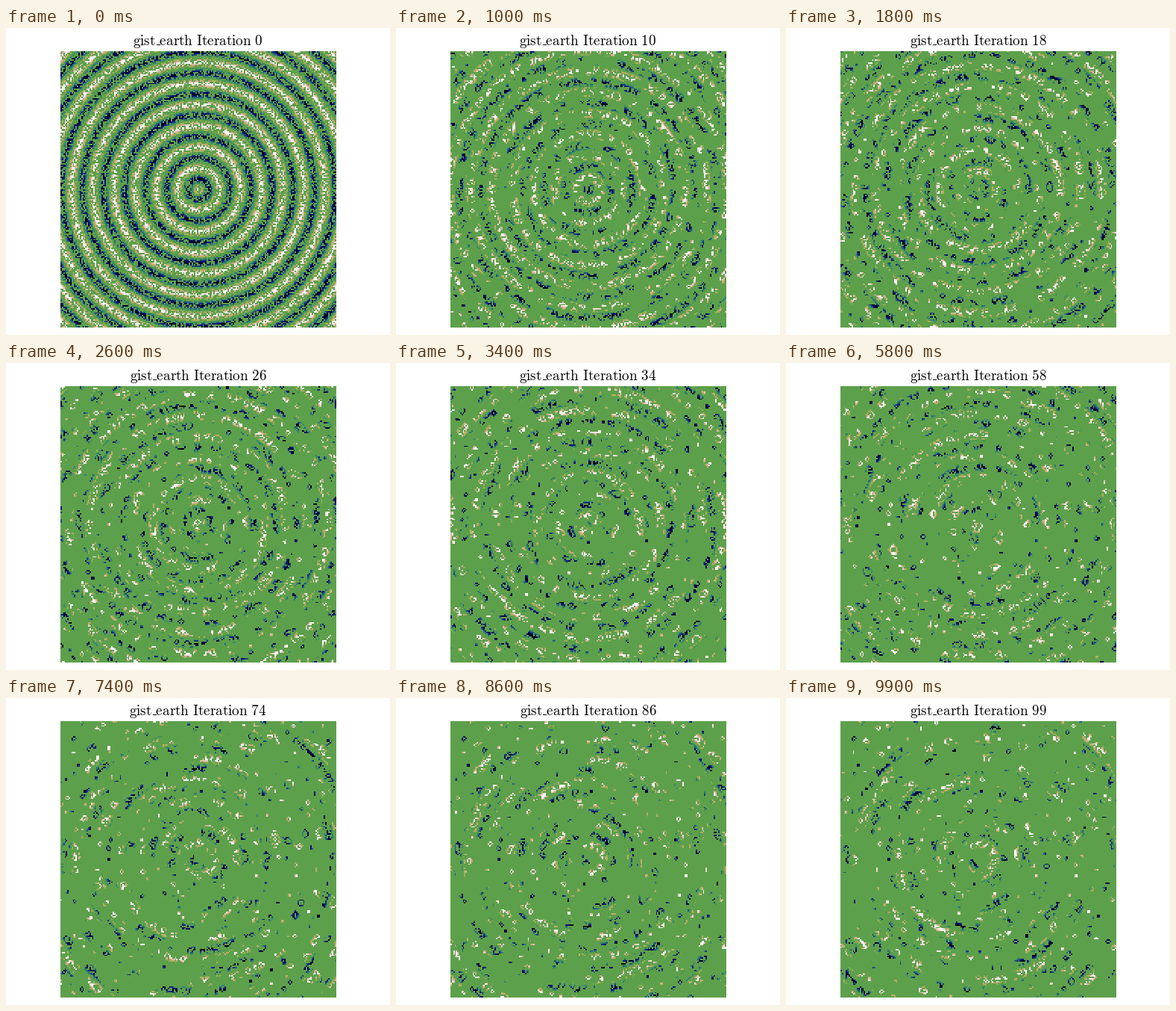
Write a matplotlib script that moves like this. It is 515 px wide and 411 px high and loops after 10 s.

```python
import matplotlib.pyplot as plt
import numpy as np
from matplotlib.animation import FuncAnimation
from matplotlib.patches import Rectangle

W, H, DPI = 515, 411, 100
N, FRAMES = 200, 100
REACH = 13 * np.pi  # wave phase from the centre to the edge

plt.rcParams["mathtext.fontset"] = "cm"


def step(cells):
    """One generation of Conway's Game of Life on a torus."""
    count = sum(
        np.roll(cells, (dy, dx), (0, 1))
        for dy in (-1, 0, 1) for dx in (-1, 0, 1) if dy or dx
    )
    return ((count == 3) | ((cells == 1) & (count == 2))).astype(int)


rng = np.random.default_rng(7)
history = [rng.integers(0, 2, (N, N))]
while len(history) < FRAMES:
    history.append(step(history[-1]))

axis = np.linspace(-REACH, REACH, N)
radius = np.hypot(*np.meshgrid(axis, axis))


def field(i):
    """Living cells coloured by a wave that runs outwards."""
    return history[i] * np.cos(radius - i)


fig = plt.figure(figsize=(W / DPI, H / DPI), dpi=DPI, facecolor="white")
ax = fig.add_axes([73 / W, 10 / H, 370 / W, 370 / H])
ax.axis("off")
image = ax.imshow(field(0), cmap="gist_earth", vmin=-1, vmax=1,
                  interpolation="nearest", aspect="auto")
title = fig.text(257.5 / W, (H - 22.7) / H, "", fontsize=13.8,
                 ha="center", va="baseline")
underscore = Rectangle((0, (H - 23) / H), 5.8 / W, 1 / H, color="black",
                       lw=0, transform=fig.transFigure)
fig.add_artist(underscore)


def draw(i):
    image.set_data(field(i))
    title.set_text(
        rf"$\mathrm{{gist}}\hspace{{0.36}}\mathrm{{earth\ Iteration\ {i}}}$")
    underscore.set_x((201.5 - 5 * (len(str(i)) - 1)) / W)
    return image, title, underscore


anim = FuncAnimation(fig, draw, frames=FRAMES, interval=100,
                     repeat=True, repeat_delay=0)
plt.show()
```
